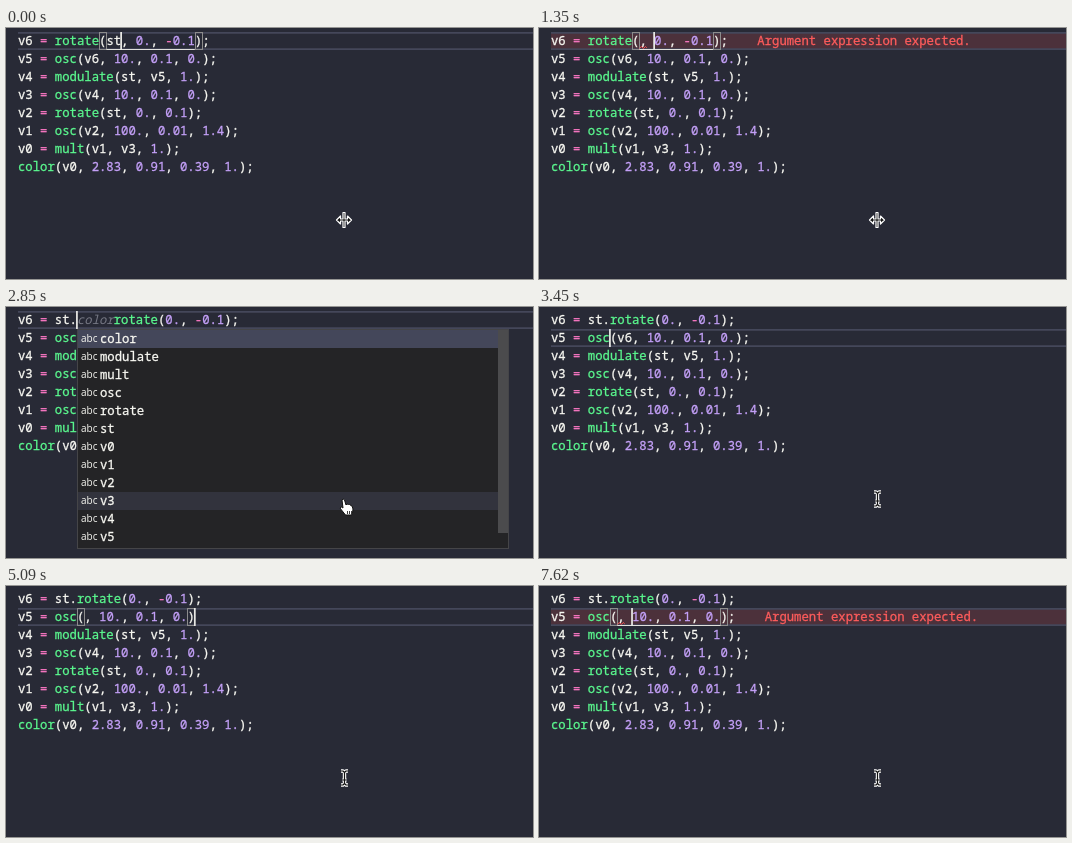
An HTML page that plays this animation: 527 px wide and 251 px high, repeating every 8000 ms.

```html
<!DOCTYPE html>
<html>
<head>
<meta charset="utf-8">
<style>
  html, body { margin: 0; width: 100%; height: 100%; overflow: hidden; background: #282a36; }
  svg { display: block; }
  text {
    font: 12.28px "Noto Sans Mono", monospace; white-space: pre; font-variant-ligatures: none;
    color: #f8f8f2;
  }
  text, tspan { fill: currentColor; stroke: currentColor; stroke-width: .3px; }
  .fn { color: #5af78e; }
  .num { color: #c4a0f8; }
  .op { color: #ff79c6; }
  .err { color: #ff5c5c; }
  .ghost { color: #777985; font-style: italic; stroke: none; }
  .abc { font: 10px "Open Sans", sans-serif; stroke: none; }
</style>
</head>
<body>
<svg id="stage" width="527" height="251"></svg>
<script>
const LEFT = 12, TOP = 4, ROW = 18, CHAR = 7.368, LOOP = 8000;
const stage = document.getElementById('stage');

const lines = [
  'v6 = st.rotate(0., -0.1);',
  'v5 = osc(v6, 10., 0.1, 0.);',
  'v4 = modulate(st, v5, 1.);',
  'v3 = osc(v4, 10., 0.1, 0.);',
  'v2 = rotate(st, 0., 0.1);',
  'v1 = osc(v2, 100., 0.01, 1.4);',
  'v0 = mult(v1, v3, 1.);',
  'color(v0, 2.83, 0.91, 0.39, 1.);'
];
const words = ['color', 'modulate', 'mult', 'osc', 'rotate', 'st', 'v0', 'v1', 'v2', 'v3', 'v4', 'v5'];

const full = 'v6 = rotate(st, 0., -0.1);';
const cut = 'v6 = rotate(, 0., -0.1);';
const bare = 'v6 = rotate(0., -0.1);';
const osc = lines[1];
const oscCut = 'v5 = osc(, 10., 0.1, 0.);';
const oscOpen = oscCut.slice(0, -1);

// [start ms, edited row, its text, caret column, flags, selection end]
// flags: b = brackets, e = error, h = matching words, p = popup
const steps = [
  [0, 0, full, 14, 'b'],
  [450, 0, full, 13, 'b', 14],
  [600, 0, full, 12, 'bh', 14],
  [750, 0, cut, 12, 'b'],
  [900, 0, cut, 13, 'b'],
  [1050, 0, cut, 13, 'be'],
  [1350, 0, cut, 14, 'be'],
  [1500, 0, cut.replace('(, ', '(,'), 13, 'b'],
  [1800, 0, cut.replace('(, ', '(,'), 13, 'be'],
  [1950, 0, bare, 12, 'b'],
  [2100, 0, bare, 5, ''],
  [2550, 0, 'v6 = strotate(0., -0.1);', 7, ''],
  [2850, 0, 'v6 = st.~color~rotate(0., -0.1);', 8, 'p'],
  [3450, 1, osc, 8, ''],
  [3600, 1, osc, 11, ''],
  [3900, 1, osc, 11, 'b'],
  [4500, 1, osc, 10, 'b', 11],
  [4650, 1, osc, 9, 'bh', 11],
  [4800, 1, oscCut, 9, 'b'],
  [4950, 1, oscCut, 9, 'be'],
  [5090, 1, oscOpen, 24, 'b'],
  [5390, 1, oscOpen, 24, 'be'],
  [5680, 1, oscCut, 25, 'be'],
  [5830, 1, oscCut, 25, 'e'],
  ...[23, 21, 18, 16, 14, 13].map((col, i) => [6430 + i * 148, 1, oscCut, col, 'be']),
  [7620, 1, oscCut, 11, 'be']
];

const colX = col => LEFT + col * CHAR;
const rowY = row => TOP + row * ROW;
const rect = (x, y, w, h, fill, more = '') =>
  `<rect x="${x}" y="${y}" width="${w}" height="${h}" fill="${fill}" ${more}/>`;
const label = (x, y, body, cls = '') => `<text x="${x}" y="${y}" class="${cls}">${body}</text>`;

function paint(code) {
  return code.replace(/~(\w+)~|\d+\.\d*|[a-z]\w*(?=\()|[=-]|[a-z]\w*/g, (word, ghost, at) => {
    if (ghost) return `<tspan class="ghost">${ghost}</tspan>`;
    const cls = /^\d/.test(word) ? 'num' : /^[=-]/.test(word) ? 'op'
      : code[at + word.length] === '(' ? 'fn' : '';
    return cls ? `<tspan class="${cls}">${word}</tspan>` : word;
  });
}

// Boxes around the bracket pair, joined by a guide while the caret is inside
function brackets(text, col, y) {
  const open = text.indexOf('('), close = text.lastIndexOf(')');
  const box = at => rect(Math.round(colX(at)) + .5, y + .5, 7, 17, 'none', 'stroke="#8c8c8c"');
  const guide = col > open && col <= close
    ? rect(colX(open + 1), y + 17, (close - open - 1) * CHAR, 1, '#e0e0dc') : '';
  return box(open) + box(close) + guide;
}

function squiggle(x, y) {
  return `<path d="M${x} ${y}l2 -2l2 2l2 -2l1.4 1.4" fill="none" stroke="#ff5555"/>`;
}

function popup() {
  let out = rect(71.5, 22.5, 431, 219, '#242426', 'stroke="#454548"') +
    rect(72, 23, 420, 18, '#44475a') + rect(72, 185, 420, 18, '#32333d') +
    rect(492, 23, 10, 203, '#4b4b4d');
  words.forEach((word, i) => {
    out += label(75, 35 + i * ROW, 'abc', 'abc') + label(94, 36 + i * ROW, word);
  });
  return out;
}

const outline = (d, x, y, fill) =>
  `<path transform="translate(${x} ${y})" d="${d}" fill="${fill}" stroke-linejoin="round" `;
const pointers = {
  move: outline('M-7.5 0l4 -4v3h2.5v-6.5h2v6.5h2.5v-3l4 4l-4 4v-3h-2.5v6.5h-2v-6.5h-2.5v3z', 338, 192, '#111') +
    'stroke="#fff" stroke-width="1.2"/>',
  hand: outline('M-3 -6q1 -2 2.5 0l1.5 5l1 -1l1.5 .5l1 0l1.5 1l1 .5l1 3l-.5 4l-1 2h-6l-4 -5l-1.5 -2q1 -2 3 0z', 339, 199, '#fff') +
    'stroke="#111"/><path d="M341.5 204v3M343.5 204v3M345.5 204v3" stroke="#111" stroke-width=".8"/>',
  beam: ['#fff" stroke-width="3.4', '#111" stroke-width="1.2'].map(stroke =>
    outline('M-3.5 -7h2l1.5 1.5l1.5 -1.5h2M0 -5.5v11M-3.5 7h2l1.5 -1.5l1.5 1.5h2M-2 2h4', 338.5, 192, 'none') +
    `stroke="${stroke}"/>`).join('')
};

function draw([, row, text, col, flags, selEnd]) {
  const has = flag => flags.includes(flag), y = rowY(row), width = 527 - LEFT;
  let out = '';
  if (has('e')) out += rect(LEFT, y, width, ROW, '#ff5555', 'fill-opacity=".17"');
  out += rect(LEFT, y, width, 1.75, '#44475a') + rect(LEFT, y + 16.25, width, 1.75, '#44475a');
  if (selEnd) out += rect(colX(col), y, (selEnd - col) * CHAR, ROW, '#44475a');
  if (has('h')) {
    const spots = row ? [[0, 0]] : [[2, 14], [4, 12]];
    for (const [r, c] of spots) out += rect(colX(c), rowY(r), 2 * CHAR, ROW, '#424450');
  }
  lines.forEach((line, i) => {
    out += label(LEFT, rowY(i) + 13, paint(i === row ? text : line));
  });
  if (has('b')) out += brackets(text, col, y);
  if (has('e')) {
    out += label(colX(text.length + 4), y + 13, 'Argument expression expected.', 'err') +
      squiggle(colX(text.indexOf('(') + 1), y + 16.5);
  }
  out += rect(colX(col) - .9, y, 1.75, ROW, '#e8e8e4');
  if (has('p')) out += popup();
  stage.innerHTML = out + pointers[has('p') ? 'hand' : row ? 'beam' : 'move'];
}

let shown;
function tick() {
  const time = performance.now() % LOOP;
  const step = steps.findLast(s => s[0] <= time);
  if (step !== shown) draw(shown = step);
  requestAnimationFrame(tick);
}
tick();
</script>
</body>
</html>
```
